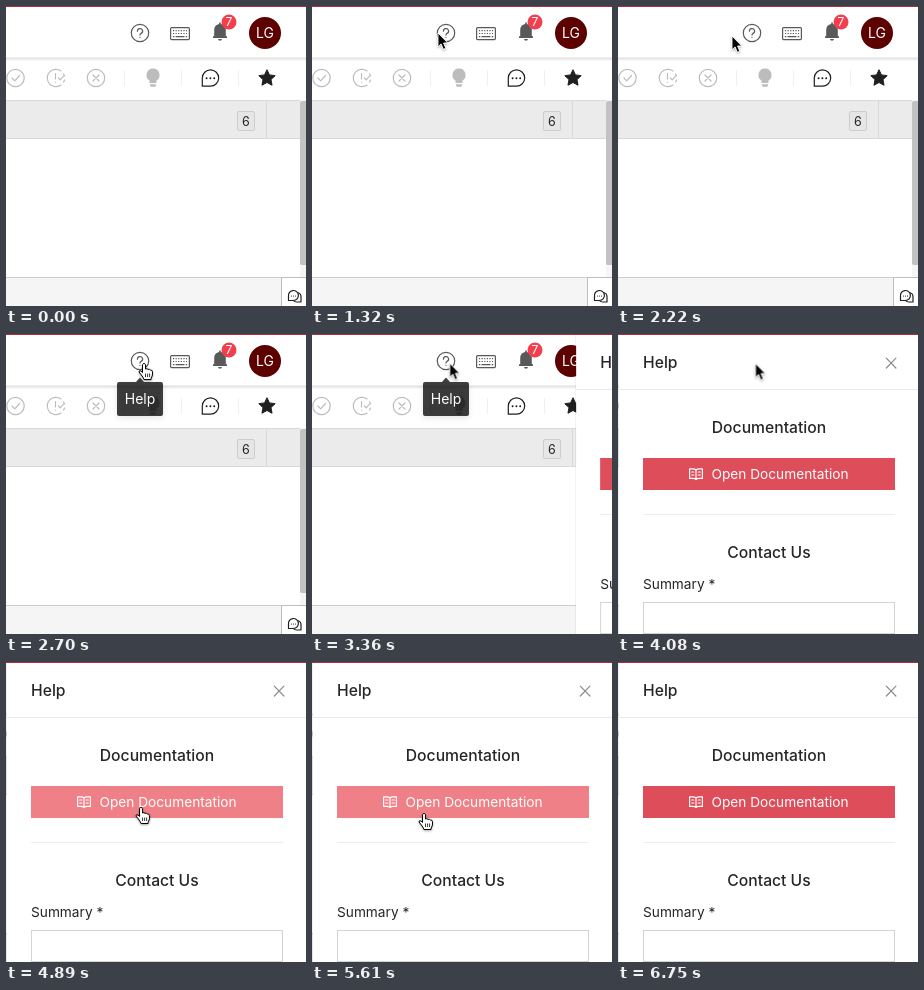
An HTML page for the animation above (7110 ms loop, 300 by 300 pixels).

```html
<!DOCTYPE html>
<html lang="en">
<head>
<meta charset="utf-8">
<title>Help panel</title>
<style>
  html, body { margin: 0; width: 100%; height: 100%; overflow: hidden; background: #fff; }
  svg { display: block; width: 100%; height: 100%; }
  text { font: 14px Inter, "Open Sans", sans-serif; fill: #262626; }
  .mid { text-anchor: middle; }
  .title { font-size: 15.7px; font-weight: 500; }
  .body { font-size: 13.7px; }
  .light { fill: #fff; }
  .line { fill: none; stroke-width: 1.2; stroke-linecap: round; stroke-linejoin: round; }
  .dark { stroke: #595959; }
  .pale { stroke: #bcbcbc; }
  .black { stroke: #1f1f1f; }
  #tip { transform-origin: 134px 45px; }
</style>
</head>
<body>
<svg viewBox="0 0 300 300">
  <defs>
    <linearGradient id="fade" x2="0" y2="1">
      <stop stop-color="#000" stop-opacity=".13"/>
      <stop offset="1" stop-color="#000" stop-opacity="0"/>
    </linearGradient>
    <filter id="soft" x="-50%" y="-50%" width="200%" height="200%">
      <feDropShadow dx="0" dy="2" stdDeviation="3" flood-opacity=".13"/>
    </filter>
    <filter id="drop" x="-50%" y="-50%" width="200%" height="200%">
      <feDropShadow dx="0" dy="1" stdDeviation=".8" flood-opacity=".35"/>
    </filter>
  </defs>

  <g id="page">
    <rect width="300" height="300" fill="#fff"/>
    <rect y="51.5" width="300" height="4" fill="url(#fade)"/>

    <!-- header -->
    <circle class="line dark" cx="134" cy="27" r="8.7"/>
    <path class="line dark" d="M131.4 25.2a2.6 2.5 0 1 1 3.7 2.2q-1.1.6-1.1 1.7M134 31.4v.1"/>
    <rect class="line dark" x="164.6" y="21.6" width="18.8" height="12" rx="1"/>
    <path class="line dark" stroke-dasharray="1.2 1.4" style="stroke-linecap:butt" d="M167 24.7h14M167 27.5h14"/>
    <path class="line dark" d="M167.3 30.7h.6M170 30.7h8M180.2 30.7h.6"/>
    <path fill="#595959" d="M213.2 18v-1.5h1.6V18q5 .9 5 6v6.3h1.2V32h-14v-1.700h1.200V24q0-5.100 5-6zM212 33h4q-.3 1.700-2 1.700t-2-1.700z"/>
    <circle cx="223" cy="16" r="7.500" fill="#f23f4d"/>
    <text class="mid light" x="223" y="20.300" style="font-size:12px">7</text>
    <circle cx="259" cy="27" r="16" fill="#5c0000"/>
    <text class="mid light" x="259" y="32">LG</text>

    <!-- toolbar -->
    <circle class="line pale" cx="9.500" cy="72" r="8.700"/>
    <path class="line pale" d="M6 72l2.700 2.800 4.800-5.300"/>
    <path class="line pale" d="M55 64.900A8.700 8.700 0 1 0 55 79.100M57.600 68a8.700 8.700 0 0 1 .9 2M58.500 74a8.700 8.700 0 0 1-.9 2"/>
    <path class="line pale" stroke-width="1.600" d="M49.500 67.500v5.500M49.500 76v.2M52.500 72l1.700 1.800 3.300-3.600"/>
    <circle class="line pale" cx="90" cy="72" r="8.700"/>
    <path class="line pale" d="M87 69l6 6M93 69l-6 6"/>
    <path stroke="#f0f0f0" d="M118.500 64v16M175.500 64v16M232.500 64v16"/>
    <path fill="#bcbcbc" d="M147 62.500a6.500 6.500 0 0 1 3.500 12v2.500h-7v-2.500a6.500 6.500 0 0 1 3.500-12zM144 78.300h6v1q0 1.500-1.500 1.500h-3q-1.500 0-1.500-1.500z"/>
    <path class="line black" stroke-width="1.400" d="M196.300 80.200V72a8.200 8.200 0 1 1 8.200 8.200z"/>
    <path fill="none" stroke="#1f1f1f" stroke-width="2" stroke-linecap="round" d="M200.600 72.200h0M204.400 72.200h0M208.200 72.200h0"/>
    <path id="star" fill="#1f1f1f" stroke="#1f1f1f" stroke-linejoin="round"/>

    <!-- table row and footer -->
    <rect y="94" width="294" height="39" fill="#ebebeb"/>
    <path stroke="#d9d9d9" d="M0 94.500h294M0 132.500h294M260.500 95v37"/>
    <rect x="231.500" y="105.500" width="17" height="19" rx="1.500" fill="#e6e6e6" stroke="#cdcdcd"/>
    <text class="mid" x="240" y="119.500" style="font-size:12.500px">6</text>
    <rect x="294" y="94" width="6" height="177" fill="#f5f5f5"/>
    <rect x="294" y="95" width="8" height="164" rx="2" fill="#c2c2c2"/>
    <rect y="271" width="300" height="29" fill="#f5f5f5"/>
    <path stroke="#cfcfcf" d="M0 271.500h300"/>
    <rect x="275.500" y="271.500" width="26" height="30" fill="#fff" stroke="#bdbdbd"/>
    <path class="line black" d="M282.500 294.500v-4a5 5 0 1 1 5 4zM291.500 286.500a4.400 4.400 0 0 1 3.500 4.500v5h-4q-2.500 0-3.600-1.500M285.500 290h0M287.500 290h0M289.500 290h0"/>
  </g>

  <g id="panel">
    <rect x="0" width="1" height="300" fill="#000" opacity=".06"/>
    <rect x="1" width="300" height="300" fill="#fff"/>
    <text class="title" x="25" y="34">Help</text>
    <path class="line" stroke="#8c8c8c" d="M268.300 24.200l9.600 9.800M277.900 24.200l-9.600 9.800"/>
    <path stroke="#e8e8e8" d="M1 55.500h300"/>
    <text class="title mid" x="151" y="99">Documentation</text>
    <rect id="button" x="25" y="124" width="252" height="32" fill="#dd4d5a"/>
    <path class="line" stroke="#fff" d="M78 136v9.500M78 136q-1-1.200-3-1.200h-3.400v9.600H75q2 0 3 1.200 1-1.200 3-1.200h3.400v-9.600H81q-2 0-3 1.200M73.700 138h2.200M73.700 141h2.200M80.100 138h2.200M80.100 141h2.200"/>
    <text class="mid body light" x="162" y="145">Open Documentation</text>
    <path stroke="#ededed" d="M25 180.500h252"/>
    <text class="title mid" x="151" y="224">Contact Us</text>
    <text class="body" x="25" y="255">Summary *</text>
    <rect x="25.500" y="268.500" width="251" height="31" fill="#fff" stroke="#d4d4d4"/>
  </g>

  <rect width="300" height="1" fill="#a82f3b"/>

  <g id="tip">
    <path filter="url(#soft)" fill="#000" fill-opacity=".75" d="M113 48h17l4-4.500 4 4.500h17q2 0 2 2v30q0 2-2 2h-42q-2 0-2-2v-30q0-2 2-2z"/>
    <text class="mid light" x="134" y="70">Help</text>
  </g>

  <g id="cursor">
    <path id="arrow" filter="url(#drop)" stroke="#fff" stroke-width=".9" d="M0 0v13.800l3.100-2.900 2.200 5.400 2.500-1-2.200-5.300h4.200z"/>
    <g id="hand" filter="url(#drop)">
      <path fill="#fff" stroke="#000" stroke-linejoin="round" d="M-1.500 1.500q1.500-2.600 3 0V6q1.500-.8 2.500.4 1.500-.8 2.300.7 2.200-.5 2.200 1.700V11q0 2-1.400 4v1.500H0q-.8-2.300-2.600-4.500L-5 9q0-2 2-1l1.500 1.500z"/>
      <path stroke="#000" stroke-width=".8" d="M1.500 10.500v3.500M3.600 10.500v3.500M5.600 10.500v3.500"/>
    </g>
  </g>
</svg>
<script>
  const LOOP = 7110;
  const $ = id => document.getElementById(id);

  $('star').setAttribute('d', 'M' + Array.from({ length: 10 }, (_, i) => {
    const r = i % 2 ? 4.2 : 8.6, a = i * Math.PI / 5;
    return `${261 + r * Math.sin(a)} ${72.3 - r * Math.cos(a)}`;
  }).join('L') + 'z');

  // Each step is [ms, value, easing towards the next step].
  function play(id, prop, steps) {
    const all = [[0, steps[0][1]], ...steps, [LOOP, steps.at(-1)[1]]];
    $(id).animate(
      all.map(([ms, value, easing = 'linear']) => ({ offset: ms / LOOP, [prop]: value, easing })),
      { duration: LOOP, iterations: Infinity });
  }

  const at = (x, y) => `translate(${x}px, ${y}px)`;
  const SMOOTH = 'ease-in-out', OUT = 'ease-out';

  play('cursor', 'transform', [
    [300, at(166, 304), SMOOTH],
    [870, at(87, 13)],
    [1190, at(87, 13), OUT],
    [1320, at(126, 27)],
    [1440, at(126, 27), SMOOTH],
    [1560, at(130, 31), SMOOTH],
    [1680, at(90, 20), SMOOTH],
    [1790, at(128, 30), SMOOTH],
    [1890, at(93, 13)],
    [1920, at(125, 36)],
    [1980, at(114, 30)],
    [2220, at(114, 30), SMOOTH],
    [2640, at(138, 29)],
    [4080, at(137.5, 29.5), SMOOTH],
    [4770, at(103, 145), SMOOTH],
    [5070, at(198, 145)],
    [5400, at(198, 145), SMOOTH],
    [5610, at(112, 151)],
    [6470, at(112, 151), 'ease-in'],
    [6740, at(140, 306)]
  ]);

  const handTimes = [[2400, 3030], [4500, 6600]];
  const toggle = (id, on, off) => play(id, 'opacity', [
    [0, off, 'steps(1)'],
    ...handTimes.flatMap(([from, to]) => [[from, on, 'steps(1)'], [to, off, 'steps(1)']])
  ]);
  toggle('hand', 1, 0);
  toggle('arrow', 0, 1);

  play('tip', 'opacity', [[2570, 0, OUT], [2700, 1], [3390, 1], [3480, 0]]);
  play('tip', 'transform', [[2570, 'scale(.8)', OUT], [2700, 'scale(1)']]);

  play('panel', 'transform', [
    [3300, at(301, 0), 'cubic-bezier(.7, .3, .1, 1)'],
    [3600, at(0, 0)]
  ]);

  const RED = '#dd4d5a', PINK = '#f08087';
  play('button', 'fill', [
    [4500, RED, SMOOTH], [4770, PINK],
    [6570, PINK, SMOOTH], [6750, RED]
  ]);
</script>
</body>
</html>
```
